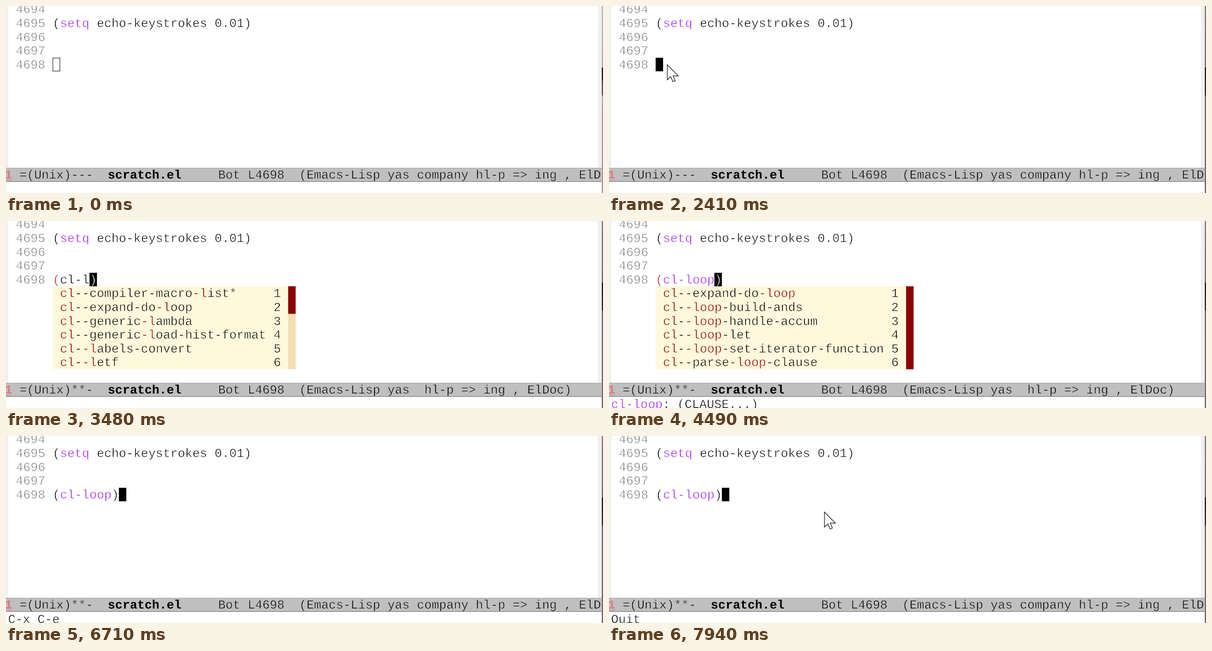
These frames come from a looping animation (1280 px wide and 401 px high, 8000 ms). An HTML page:

```html
<!DOCTYPE html>
<html lang="en">
<head>
<meta charset="utf-8">
<title>Editor session</title>
<style>
  html, body { margin: 0; width: 100%; height: 100%; overflow: hidden; background: #fff; }
  svg { display: block; width: 100vw; height: 100vh; --paper: #fff; }
  /* A stroke in the paper colour slims the letters. */
  text {
    font: 26.31px "Liberation Mono", "Courier New", monospace;
    white-space: pre;
    text-rendering: geometricPrecision;
    stroke: var(--paper);
    stroke-width: .7px;
  }
  #popup { --paper: #fff8dc; }
  #status { --paper: #bfbfbf; }
  .num { fill: #7f7f7f; }
  .keyword { fill: #a020f0; }
  .match { fill: #8b0000; }
  .paren { fill: #b22222; }
  .fading { fill: #a0522d; }
  .inverse { fill: #fff; stroke: #000; }
  .bold { font-weight: bold; stroke: none; }
</style>
</head>
<body>
<svg viewBox="0 0 1280 401" preserveAspectRatio="none">
  <defs>
    <linearGradient id="edgeLight" x2="0" y2="1">
      <stop offset="0" stop-color="#b4b4b4"/><stop offset=".33" stop-color="#a8a4a4"/>
      <stop offset=".33" stop-color="#0c0808"/><stop offset=".4" stop-color="#18100c"/>
      <stop offset=".4" stop-color="#4a3830"/><stop offset=".48" stop-color="#5c4a44"/>
      <stop offset=".48" stop-color="#b0aaaa"/><stop offset=".55" stop-color="#b89494"/>
      <stop offset="1" stop-color="#b08c8c"/>
    </linearGradient>
    <linearGradient id="edgeDark" x2="0" y2="1">
      <stop offset="0" stop-color="#77707a"/><stop offset=".33" stop-color="#6a636c"/>
      <stop offset=".33" stop-color="#140e14"/><stop offset=".48" stop-color="#2a2028"/>
      <stop offset=".48" stop-color="#64586a"/><stop offset="1" stop-color="#6c5c64"/>
    </linearGradient>
  </defs>
  <rect width="1280" height="401" fill="#fff"/>
  <rect width="5" height="347" fill="#f0f0f0"/>
  <rect x="1269" width="8" height="347" fill="#f0f0f0"/>
  <g id="buffer"></g>
  <g id="popup"></g>
  <rect y="347" width="1277" height="30" fill="#bfbfbf"/>
  <rect y="347" width="1277" height="1" fill="#a4a4a4"/>
  <rect y="376" width="1277" height="1" fill="#686868"/>
  <rect y="373" width="12" height="1" fill="#e0787f"/>
  <g id="status"></g>
  <g id="echo"></g>
  <rect x="1277" width="3" height="401" fill="#fff"/>
  <rect id="edge" x="1277.5" width="2.5" height="401"/>
  <path id="pointer" d="M0 0V32.3L7.3 25.5L12 36.3L17 34.3L12.4 23.8H23.4Z" fill="#fff" stroke="#000" stroke-width="1.2"/>
</svg>
<script>
const LOOP = 8000, CELL = 15.79, ROW = 29.6, LEFT = 100, BASE = 133.7;
const $ = id => document.getElementById(id);
const col = n => LEFT + n * CELL;
const edgeOf = n => Math.round(col(n));
const span = (cls, s) => `<tspan class="${cls}">${s}</tspan>`;
const text = (x, y, body, cls = '') => `<text x="${x}" y="${y}" class="${cls}">${body}</text>`;
const rect = (x, y, w, h, fill) => `<rect x="${x}" y="${y}" width="${w}" height="${h}" fill="${fill}"/>`;

const wide = ['cl--expand-do-loop', 'cl--generic-load-hist-format', 'cl--loop-build-ands',
  'cl--loop-handle-accum', 'cl--loop-let', 'cl--loop-set-iterator-function'];
const loops = [wide[0], ...wide.slice(2), 'cl--parse-loop-clause'];
const early = ['cl--compiler-macro-list*', wide[0], 'cl--generic-lambda', wide[1],
  'cl--labels-convert', 'cl--letf'];

// Each step overrides part of the editor state from its time on.
const steps = [
  [0, { code: '', paren: '', focus: false, names: null, thumb: 6, echo: '' }],
  [1000, { focus: true }],
  [2530, { code: '(', paren: 'paren' }],
  [2650, { code: '(c' }],
  [2720, { code: '(cl' }],
  [2800, { code: '(cl-' }],
  [2880, { code: '(cl-l', names: early, thumb: 2 }],
  [3500, { code: '(cl-lo', names: wide, thumb: 4 }],
  [3700, { code: '(cl-loo', names: loops, thumb: 6 }],
  [3850, { code: '(cl-loop' }],
  [4300, { echo: span('keyword', 'cl-loop') + ': (CLAUSE...)' }],
  [4900, { code: '(cl-loop)', paren: 'fading', names: null, echo: '' }],
  [5130, { echo: 'C-x-' }],
  [5500, { echo: 'C-x C-e' }],
  [6710, { paren: '' }],
  [7620, { echo: 'Quit' }],
];

const moves = [
  [[70, 1275, 370], [450, 560, 232], [640, 285, 165], [830, 128, 128], [1200, 125, 126], [2530, 125, 126]],
  [[7620, 125, 126], [7740, 250, 122], [7900, 462, 163], [8000, 462, 163]],
];

function drawBuffer({ code, paren, focus }) {
  let out = '';
  for (let i = 0; i < 5; i++) out += text(col(-5), BASE - (4 - i) * ROW, 4694 + i, 'num');
  out += text(LEFT, BASE - 3 * ROW, '(' + span('keyword', 'setq') + ' echo-keystrokes 0.01)');

  const closed = code.endsWith(')');
  const name = code.slice(1, closed ? -1 : undefined);
  if (code) {
    out += text(LEFT, BASE, span(paren, '(') +
      span(name === 'cl-loop' ? 'keyword' : '', name) + (closed ? ')' : ''));
  }
  const x = edgeOf(code.length);
  if (focus) out += rect(x, 111, 16, 29, '#000');
  else out += `<rect x="${x + .5}" y="111.5" width="15" height="28" fill="none" stroke="#000"/>`;
  if (code && !closed) out += text(col(code.length), BASE, ')', 'inverse');
  return out;
}

function drawPopup({ code, names, thumb }) {
  if (!names) return '';
  const top = 140, height = 178;
  const width = Math.max(...names.map(n => n.length));
  const barX = edgeOf(width + 4), suffix = code.slice(3);
  let out = rect(LEFT, top, barX - LEFT, height, '#fff8dc') +
    rect(barX, top, 16, height, '#f5deb3') +
    rect(barX, top, 16, Math.round(thumb * height / 6), '#8b0000');
  names.forEach((name, i) => {
    const at = name.indexOf(suffix), y = BASE + (i + 1) * ROW;
    out += text(col(1), y, span('match', 'cl') + name.slice(2, at) +
      span('match', suffix) + name.slice(at + suffix.length));
    out += text(col(width + 2), y, i + 1);
  });
  return out;
}

function drawStatus({ code, names }) {
  const flags = code ? '**-' : '---', mode = names ? '' : 'company';
  return text(-2.6, 370, `<tspan class="bold" fill="#e0787f">1</tspan> =(Unix)${flags}  ` +
    span('bold', 'scratch.el') +
    `     Bot L4698  (Emacs-Lisp yas ${mode} hl-p =&gt; ing , ElDoc)`);
}

function pointerAt(t) {
  const path = moves.find(p => t >= p[0][0] && t < p[p.length - 1][0]);
  if (!path) return null;
  const i = path.findIndex(p => p[0] > t);
  const [t0, x0, y0] = path[i - 1], [t1, x1, y1] = path[i];
  const k = (t - t0) / (t1 - t0);
  return [x0 + (x1 - x0) * k, y0 + (y1 - y0) * k];
}

let shown = -1;
const start = performance.now();

function frame() {
  const t = (performance.now() - start) % LOOP;
  const past = steps.filter(s => s[0] <= t);
  if (past.length !== shown) {
    shown = past.length;
    const state = Object.assign({}, ...past.map(s => s[1]));
    $('buffer').innerHTML = drawBuffer(state);
    $('popup').innerHTML = drawPopup(state);
    $('status').innerHTML = drawStatus(state);
    $('echo').innerHTML = text(4.5, 400.7, state.echo);
  }
  $('edge').setAttribute('fill', `url(#${t < 890 ? 'edgeLight' : 'edgeDark'})`);
  const spot = pointerAt(t);
  $('pointer').style.display = spot ? '' : 'none';
  if (spot) $('pointer').setAttribute('transform', `translate(${spot})`);
  requestAnimationFrame(frame);
}
frame();
</script>
</body>
</html>
```
